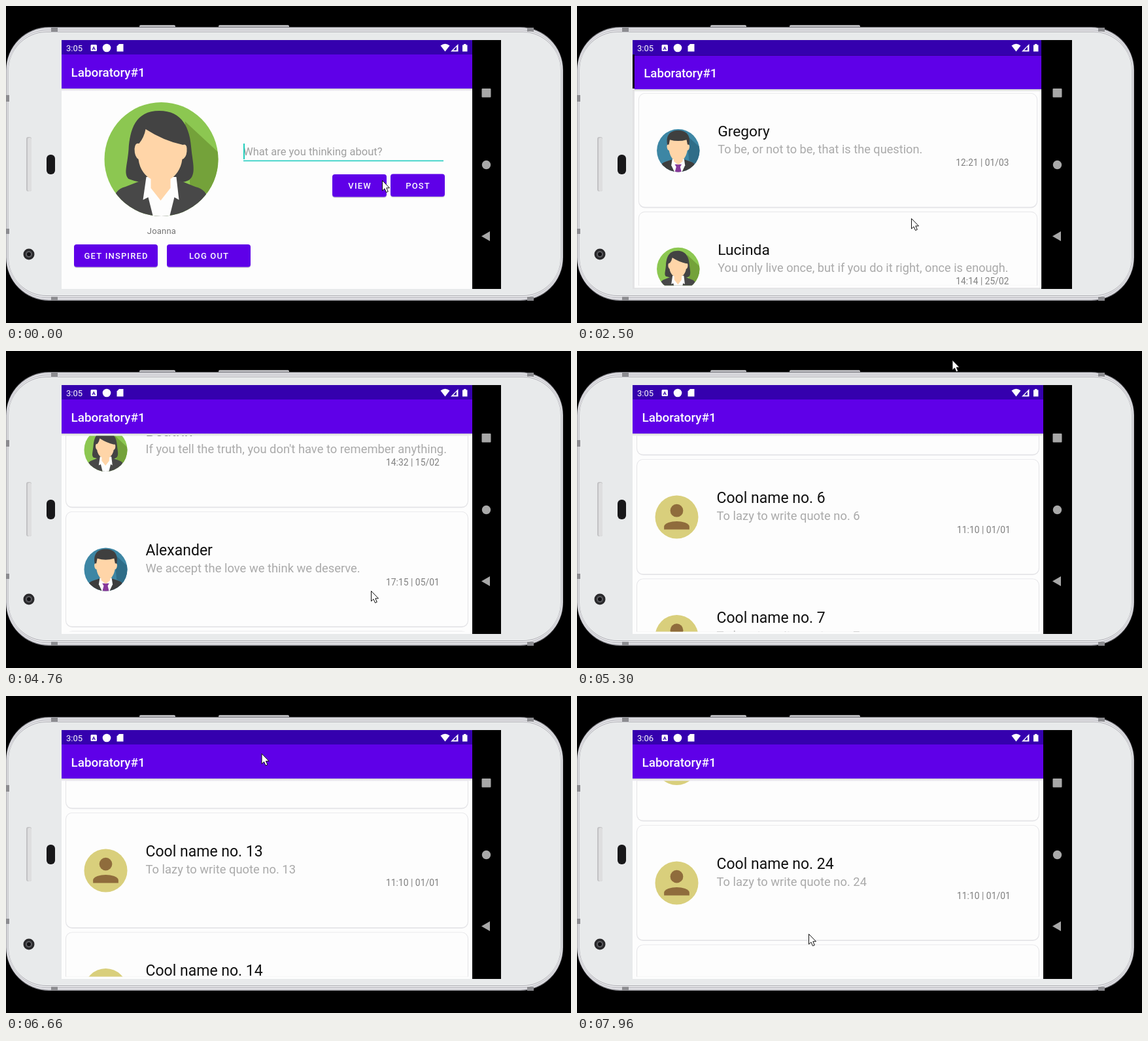
Animation, 864 px wide and 484 px high, one loop 8 s. Source, as an HTML page with a canvas:

```html
<!DOCTYPE html>
<html lang="en">
<head>
<meta charset="utf-8">
<title>Laboratory#1</title>
<style>
  html, body { margin: 0; height: 100%; overflow: hidden; background: #000; }
  canvas { display: block; }
</style>
</head>
<body>
<canvas id="stage" width="864" height="484"></canvas>
<script>
const ctx = document.getElementById('stage').getContext('2d');
const LOOP = 8000, PITCH = 182.5;
const SKIN = '#ffd5a8', WHITE = '#fdfdfd', PURPLE = '#5f00e8', STATUS = '#3500ae', GREY = '#a8a8a8';

// Keys: time, value(s)
const scrollKeys = [
  [2850, 0], [3300, 290], [3660, 387], [4250, 434.5], [4950, 434.5], [5250, 800], [5450, 1100],
  [5700, 1222.5], [6240, 1222.5], [6550, 1650], [6800, 2900], [7000, 3480], [7150, 3629],
  [7240, 3629], [7500, 3900], [7700, 4090], [7960, 4132.5]
];
const cursorKeys = [
  [30, 575, 266], [330, 588, 300], [600, 588, 300], [630, 548, 371], [1130, 548, 371],
  [1600, 535, 290], [1900, 530, 268], [2100, 530, 268], [2500, 511, 324], [2900, 514, 350],
  [3400, 560, 10], [3600, 600, -30], [3720, 800, -30], [3900, 868, 100], [4430, 749, 412],
  [4760, 558, 366], [4900, 558, 366], [5250, 570, 6], [5700, 612, 290], [5900, 368, 389],
  [6200, 368, 389], [6550, 400, 30], [6960, 330, 380], [7200, 300, 415], [7520, 350, 60],
  [7800, 354, 363]
];
const people = [
  ['Gregory', 'To be, or not to be, that is the question.', '12:21 | 01/03', 'man'],
  ['Lucinda', 'You only live once, but if you do it right, once is enough.', '14:14 | 25/02', 'woman'],
  ['Beatrix', "If you tell the truth, you don't have to remember anything.", '14:32 | 15/02', 'woman'],
  ['Alexander', 'We accept the love we think we deserve.', '17:15 | 05/01', 'man']
];

// Avatars are layers of [path, colour] inside a circle of radius 87
const avatars = {
  woman: ['#8cc751', [
    ['M36-58L92-6V62L44 40Z', '#74a23a'],
    ['M-3-74C-40-74-48-45-50-15C-52 10-58 22-50 30Q-30 38-2 36Q30 38 42 32C54 24 48 5 46-15C44-48 32-74-3-74Z', '#434343'],
    ['M-74 66Q-72 46-55 42L-24 30H22L52 42Q70 46 74 66L60 90H-60Z', '#484848'],
    ['M-23 27L-28 62L-20 58L-12 90H12L20 58L27 62L23 27Z', WHITE],
    ['M-41-16Q-40-26-34-24Q-26-34-24-46Q4-28 33-22Q40-25 39-12Q38-2 32 0C30 16 21 26 14 30V44L-1 63L-16 44V30C-24 26-33 16-35 0Q-41-4-41-16Z', SKIN]
  ]],
  man: ['#3d86a4', [
    ['M34-62L92-10V66L44 40Z', '#2f6d88'],
    ['M-44-22C-52-62-34-82 0-82C34-82 52-62 44-22Z', '#3f3f3f'],
    ['M-72 64Q-68 50-50 45L-24 36H24L50 45Q68 50 72 64L58 90H-58Z', '#3d3d3d'],
    ['M-24 34L-28 60L-14 90H14L28 60L24 34Z', WHITE],
    ['M-14 56H14L8 66L14 90H-14L-8 66Z', '#87399a'],
    ['M-46-16Q-46-26-38-24L-34-44Q0-34 34-44L38-24Q46-26 46-16Q45-2 37 0C34 18 26 32 18 37V44L0 58L-18 44V37C-26 32-34 18-37 0Q-45-2-46-16Z', SKIN]
  ]],
  blank: ['#d9cf7c', [
    ['M-26-26A26 26 0 1 0 26-26A26 26 0 1 0-26-26Z', '#8f6c3c'],
    ['M-51 50V39C-51 24-22 17 0 17S51 24 51 39V50Z', '#8f6c3c']
  ]]
};
for (const a of Object.values(avatars)) a[1] = a[1].map(([d, c]) => [new Path2D(d), c]);

// Smooth curve through the keys that never overshoots
function track(keys, t, k = 1) {
  const n = keys.length;
  if (t <= keys[0][0]) return keys[0][k];
  if (t >= keys[n - 1][0]) return keys[n - 1][k];
  const i = keys.findIndex(key => key[0] > t) - 1;
  const slope = j => keys[j + 1] && keys[j] ? (keys[j + 1][k] - keys[j][k]) / (keys[j + 1][0] - keys[j][0]) : 0;
  const tangent = j => {
    const a = slope(j - 1), b = slope(j);
    return a * b > 0 ? 2 * a * b / (a + b) : 0;
  };
  const h = keys[i + 1][0] - keys[i][0], u = (t - keys[i][0]) / h, v = 1 - u;
  return v * v * (1 + 2 * u) * keys[i][k] + u * u * (3 - 2 * u) * keys[i + 1][k]
    + h * u * v * (v * tangent(i) - u * tangent(i + 1));
}

function rect(x, y, w, h, fill, r = 0) {
  ctx.fillStyle = fill;
  ctx.beginPath();
  ctx.roundRect(x, y, w, h, r);
  ctx.fill();
}

function disc(x, y, r, fill) {
  ctx.fillStyle = fill;
  ctx.beginPath();
  ctx.arc(x, y, r, 0, 7);
  ctx.fill();
}

function shape(d, fill) {
  ctx.fillStyle = fill;
  ctx.fill(new Path2D(d));
}

function text(s, x, y, size, fill, { weight = 400, align = 'left', gap = 0 } = {}) {
  ctx.font = `${weight} ${size}px Roboto, sans-serif`;
  ctx.letterSpacing = gap + 'px';
  ctx.textAlign = align;
  ctx.fillStyle = fill;
  ctx.fillText(s, x, y);
}

function avatar(kind, x, y, r) {
  const [back, layers] = avatars[kind];
  ctx.save();
  ctx.translate(x, y);
  ctx.scale(r / 87, r / 87);
  disc(0, 0, 87, back);
  ctx.clip();
  for (const [path, fill] of layers) {
    ctx.fillStyle = fill;
    ctx.fill(path);
  }
  ctx.restore();
}

function button(label, x, y, w, pressed) {
  rect(x, y + 1, w, 35, '#d4d4d8', 4);
  rect(x, y, w, 34.5, pressed ? '#8440f0' : PURPLE, 4);
  text(label, x + w / 2 + .6, y + 22, 13, WHITE, { weight: 500, align: 'center', gap: 1.15 });
}

function phone() {
  rect(204, 29, 55, 6, '#b4b4b8', 2);
  rect(325, 29, 108, 6, '#b4b4b8', 2);
  const rims = [[0, '#94949a'], [1.5, '#e4e4e8'], [4, '#bbbbc1'], [5.5, '#f3f3f5'], [7, '#a8a8ae'], [8, '#e8eaeb']];
  for (const [d, fill] of rims) rect(d / 2, 32 + d, 852 - d, 418 - 2 * d, fill, 66 - d);
  for (const x of [69, 797]) {
    rect(x, 33, 10, 6, '#8c8c90');
    rect(x, 444, 10, 6, '#8c8c90');
  }
  rect(0, 136, 5, 10, '#8c8c90');
  rect(0, 340, 5, 8, '#8c8c90');
  rect(31, 200, 8, 83, '#c2c2c4', 3);
  rect(33, 201, 6, 82, '#dededf', 3);
  rect(62, 227, 13, 30, '#18181a', 6);
  disc(35, 379, 8.5, '#2a2a2c');
  disc(35, 379, 5, '#5c5c60');
  disc(35, 379, 3, '#121214');
  rect(85, 52, 672, 380, '#000');
  rect(727.5, 126, 14, 13.5, GREY, 1);
  disc(734.5, 242.5, 6.7, GREY);
  shape('M727 351.500L740 344V359Z', GREY);
}

function statusIcons(t) {
  text(t < 7500 ? '3:05' : '3:06', 92, 68.500, 13, WHITE);
  rect(129.500, 59, 9.500, 10, WHITE, 1.5);
  text('A', 134.300, 67, 8, STATUS, { weight: 700, align: 'center' });
  disc(154, 64, 6.3, WHITE);
  shape('M173 58H179.500V69.500H169.500V61.500Z', WHITE);
  shape('M664.500 60.500Q671.500 55 678.500 60.500L671.500 69.500Z', WHITE);
  shape('M691.500 58V69.500H680Z', WHITE);
  shape('M684 67.500L689 62V67.500Z', STATUS);
  shape('M698 59.500H700V58H703.500V59.500H705.500V69.500H698Z', WHITE);
}

function frame(body) {
  rect(85, 126, 628, 306, WHITE);
  body();
  const shade = ctx.createLinearGradient(0, 126, 0, 130);
  shade.addColorStop(0, 'rgba(70,70,80,.25)');
  shade.addColorStop(1, 'rgba(70,70,80,0)');
  rect(85, 126, 628, 4, shade);
  rect(85, 74, 628, 52, PURPLE);
  rect(85, 52, 628, 22, STATUS);
  text('Laboratory#1', 99.500, 107.500, 18.85, WHITE, { weight: 500 });
}

function home(t) {
  avatar('woman', 237.500, 234, 87);
  text('Joanna', 238, 348, 13, '#747474', { align: 'center', gap: .2 });
  text('What are you thinking about?', 363, 228, 16.55, '#a0a0a0');
  rect(363, 235.500, 306, 1.7, '#30d0c4');
  if (t < 600 || (t >= 1130 && t < 1660)) rect(363, 210, 2, 24, '#20cdbb');
  button('VIEW', 499, 257, 83, t > 1900);
  button('POST', 588, 256.500, 83);
  button('GET INSPIRED', 104, 364, 128);
  button('LOG OUT', 246, 364, 128);
}

function card(i, y, pressed) {
  const n = i + 1;
  const [name, quote, date, kind] = people[i] ||
    ['Cool name no. ' + n, 'To lazy to write quote no. ' + n, '11:10 | 01/01', 'blank'];
  rect(91, y, 616, 177, '#e4e4e7', 10);
  rect(92, y + .8, 614, 174.500, WHITE, 9);
  if (pressed) rect(185, y + 1.5, 368, 174, '#f5f5f5');
  avatar(kind, 152.500, y + 88.500, 33);
  text(name, 213.500, y + 67, 23, '#101010');
  text(quote, 213.500, y + 93, 18.37, '#aaaaaa');
  text(date, 581, y + 112.500, 13.9, '#808080');
}

function list(t) {
  const scroll = track(scrollKeys, t), first = Math.max(0, Math.floor(scroll / PITCH) - 1);
  ctx.save();
  ctx.beginPath();
  ctx.rect(85, 129.500, 628, 299);
  ctx.clip();
  for (let i = first; i < first + 4; i++) {
    card(i, 132 + i * PITCH - scroll, i === 8 && t >= 6160 && t < 6270);
  }
  ctx.restore();
}

function zoomed(scale, alpha, draw) {
  ctx.save();
  ctx.beginPath();
  ctx.rect(85, 52, 628, 380);
  ctx.clip();
  ctx.globalAlpha = alpha;
  ctx.translate(399, 242);
  ctx.scale(scale, scale);
  ctx.translate(-399, -242);
  draw();
  ctx.restore();
}

function cursor(t) {
  ctx.save();
  ctx.translate(track(cursorKeys, t, 1), track(cursorKeys, t, 2));
  const arrow = new Path2D('M.500.500V16L4 12.800L6.500 18.500L9.300 17.300L6.800 11.800H11.500Z');
  ctx.fillStyle = '#fff';
  ctx.fill(arrow);
  ctx.strokeStyle = '#111';
  ctx.stroke(arrow);
  ctx.restore();
}

function render(t) {
  ctx.clearRect(0, 0, 864, 484);
  phone();
  // Backdrop seen around the page while it grows into place
  rect(85, 52, 625, 22, STATUS);
  rect(85, 126, 625, 306, '#e2e2e4');
  const open = Math.min(1, Math.max(0, (t - 2300) / 400)), eased = 1 - (1 - open) ** 4;
  if (open < .3) zoomed(1 + .1 * eased, 1, () => frame(() => home(t)));
  if (open > 0) zoomed(.85 + .15 * eased, Math.min(1, open * 5), () => frame(() => list(t)));
  statusIcons(t);
  cursor(t);
}

const start = performance.now();
(function tick() {
  render((performance.now() - start) % LOOP);
  requestAnimationFrame(tick);
})();
</script>
</body>
</html>
```
